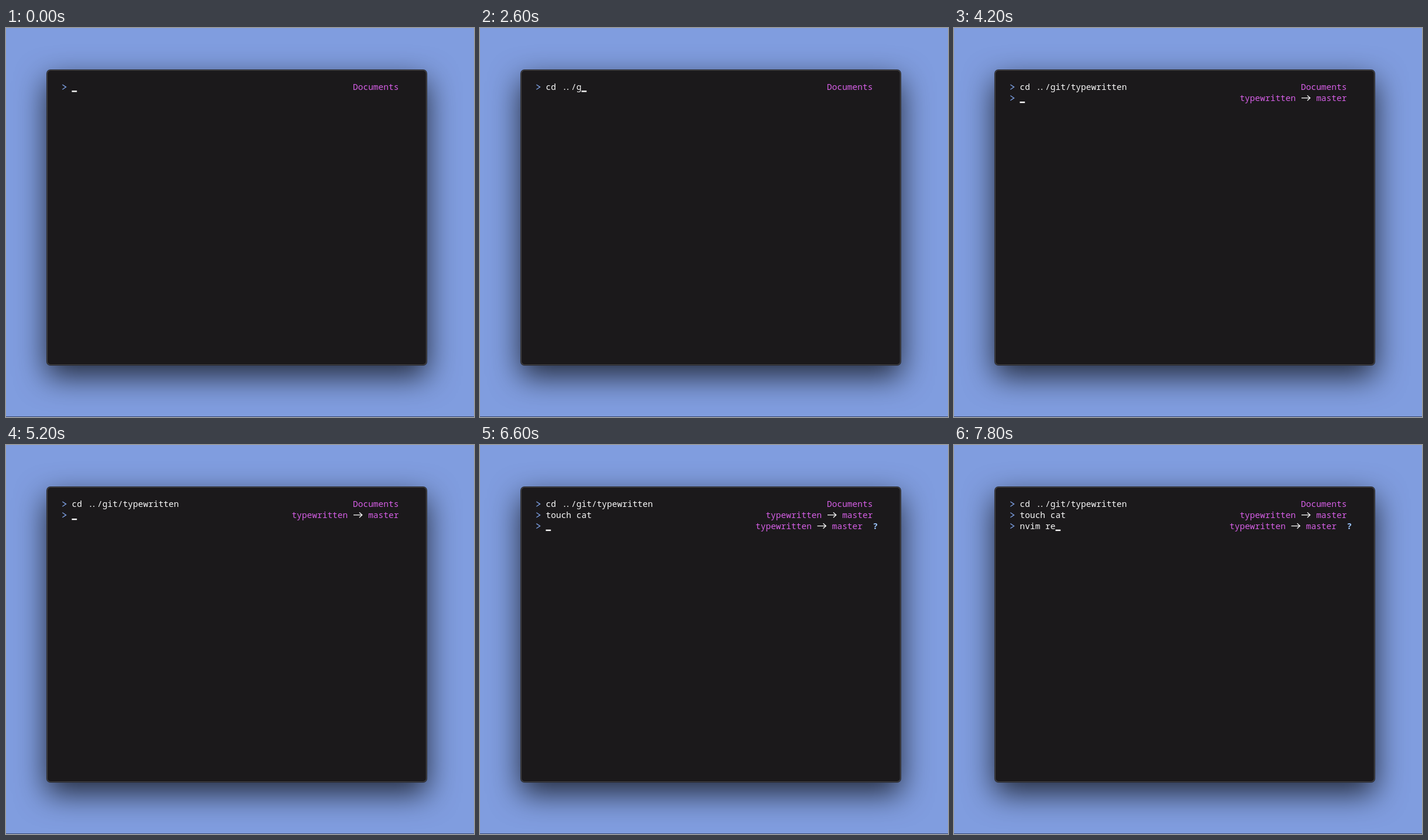
Write an HTML page with a canvas that moves like this. It is 800x666 px and loops after 8000 ms.

```html
<!DOCTYPE html>
<html lang="en">
<head>
<meta charset="utf-8">
<title>Terminal</title>
<style>
  html, body { margin: 0; width: 100%; height: 100%; overflow: hidden; background: #809ddf; }
  canvas { display: block; }
</style>
</head>
<body>
<canvas id="stage" width="800" height="666"></canvas>
<script>
const ctx = document.getElementById('stage').getContext('2d');
const LOOP = 8000;
const CELL = 8.715, ROW = 18.8;
const LEFT = 112.5, BASE = 106;
const FONT = '14.5px "Noto Sans Mono", monospace';
const WHITE = '#fafafa', BLUE = '#7ea2e6', PINK = '#d65fe6', PALE = '#9cc6ff';

// Each command: when its prompt appears, and the text shown from each time on.
const commands = [
  { start: 0, keys: [[1700, 'cd'], [1800, 'cd '], [2000, 'cd .'], [2200, 'cd ..'], [2400, 'cd ../'],
    [2600, 'cd ../g'], [2700, 'cd ../gi'], [2800, 'cd ../git'], [3000, 'cd ../git/'], [3200, 'cd ../git/t'],
    [3600, 'cd ../git/ty'], [3700, 'cd ../git/typ'], [3800, 'cd ../git/typewritten/'],
    [4200, 'cd ../git/typewritten']] },
  { start: 4200, keys: [[5400, 't'], [5500, 'to'], [5600, 'tou'], [5700, 'touc'], [5800, 'touch'],
    [5900, 'touch '], [6000, 'touch c'], [6100, 'touch ca'], [6300, 'touch cat']] },
  { start: 6600, keys: [[7300, 'nv'], [7400, 'nvi'], [7600, 'nvim'], [7700, 'nvim r'], [7800, 'nvim re']] }
];
const cursorOff = [[1000, 1500], [4700, 5200]];

function text(str, x, y, color, weight = '') {
  ctx.font = `${weight} ${FONT}`;
  ctx.fillStyle = color;
  [...str].forEach((ch, i) => {
    // Neighbouring dots sit closer together, like a coding ligature.
    const nudge = ch !== '.' ? 0 : str[i + 1] === '.' ? 1.7 : str[i - 1] === '.' ? -1.7 : 0;
    ctx.fillText(ch, x + i * CELL + nudge, y);
  });
}

function line(points, color, width) {
  ctx.beginPath();
  points.forEach(([x, y]) => ctx.lineTo(x, y));
  ctx.strokeStyle = color;
  ctx.lineWidth = width;
  ctx.stroke();
}

function branch(x, y) {
  text('typewritten', x, y, PINK);
  const ax = x + 12 * CELL, ay = y - 5;
  line([[ax + 1, ay], [ax + 15.8, ay]], WHITE, 1.3);
  line([[ax + 11, ay - 4.4], [ax + 15.8, ay], [ax + 11, ay + 4.4]], WHITE, 1.3);
  text('master', x + 15 * CELL, y, PINK);
}

function rightPrompt(row, y) {
  if (row === 0) text('Documents', 593, y, PINK);
  if (row === 1) branch(488.4, y);
  if (row === 2) {
    branch(471, y);
    text('?', 671.6, y, PALE, 'bold');
  }
}

function drawWindow() {
  ctx.fillStyle = '#809ddf';
  ctx.fillRect(0, 0, 800, 666);
  ctx.fillStyle = '#35436a';
  ctx.fillRect(0, 665, 800, 1);

  ctx.save();
  ctx.shadowColor = 'rgba(0, 0, 0, 0.73)';
  ctx.shadowBlur = 52;
  ctx.shadowOffsetY = 19;
  ctx.fillStyle = '#252529';
  ctx.beginPath();
  ctx.roundRect(69, 71, 651, 507, 7);
  ctx.fill();
  ctx.restore();

  ctx.fillStyle = '#1b191b';
  ctx.strokeStyle = '#48484c';
  ctx.lineWidth = 1.2;
  ctx.beginPath();
  ctx.roundRect(70.5, 72.5, 648, 504, 5.5);
  ctx.fill();
  ctx.stroke();
}

function draw(t) {
  drawWindow();
  const shown = commands.filter(c => t >= c.start);
  shown.forEach((command, row) => {
    const y = BASE + row * ROW;
    const typed = command.keys.filter(k => t >= k[0]).pop();
    const str = typed ? typed[1] : '';
    line([[96.4, y - 9], [102.6, y - 4.9], [96.4, y - 0.8]], BLUE, 1.3);
    text(str, LEFT, y, WHITE);
    rightPrompt(row, y);
    const blinkedOff = cursorOff.some(([from, to]) => t >= from && t < to);
    if (row === shown.length - 1 && !blinkedOff) {
      ctx.fillStyle = WHITE;
      ctx.fillRect(LEFT + str.length * CELL, y + 1.2, CELL, 2.4);
    }
  });
}

function frame() {
  draw(performance.now() % LOOP);
  requestAnimationFrame(frame);
}
frame();
</script>
</body>
</html>
```
